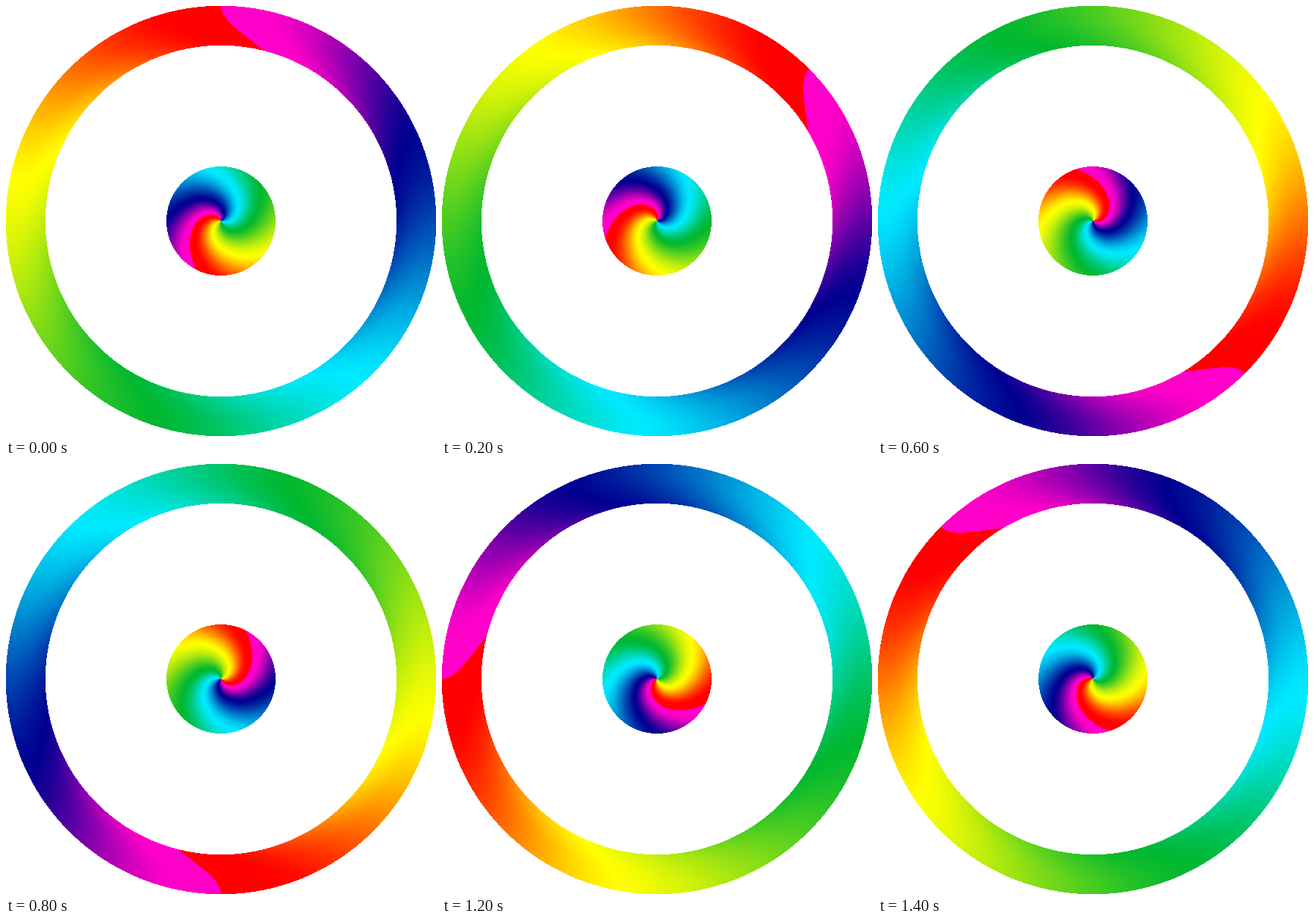
Write an HTML page with a canvas that moves like this. It is 587 px wide and 587 px high and loops after 1600 ms.

```html
<!DOCTYPE html>
<html lang="en">
<head>
<meta charset="utf-8">
<title>Twirled colour wheel</title>
<style>
  html, body { margin: 0; width: 100%; height: 100%; overflow: hidden; background: #fff; }
  canvas { display: block; }
</style>
</head>
<body>
<canvas id="stage" width="587" height="587"></canvas>
<script>
const SIZE = 587, MID = SIZE / 2;
const RING_IN = 239.7, RING_OUT = 293.8, DISC = 74.5;
const STEP_MS = 200, STEPS = 8;

// Clockwise angle in degrees, then red, green, blue
const stops = [
  [0, 255, 0, 200], [13, 255, 0, 200], [65, 0, 0, 144], [138, 0, 234, 255],
  [198, 0, 183, 47], [280, 255, 255, 0], [344, 255, 0, 0], [360, 255, 0, 0]
];

const ctx = document.getElementById('stage').getContext('2d');
const image = ctx.createImageData(SIZE, SIZE);
const pixels = new Uint32Array(image.data.buffer);
const wrap = a => ((a % 360) + 360) % 360;

function colour(angle) {
  let i = 0;
  while (angle >= stops[i + 1][0]) i++;
  const a = stops[i], b = stops[i + 1];
  const t = (angle - a[0]) / (b[0] - a[0]);
  const k = (t + t * t * (3 - 2 * t)) / 2;
  const [r, g, bl] = [1, 2, 3].map(c => Math.round(a[c] + (b[c] - a[c]) * k));
  return (255 << 24 | bl << 16 | g << 8 | r) >>> 0;
}

// Degrees by which the colours are twisted at radius r
function twist(r) {
  if (r > DISC) return 425 * (1 - r / MID) ** 2;
  const depth = DISC - r;
  return 207 + depth + 0.011 * depth * depth;
}

const palette = Uint32Array.from({ length: 3600 }, (_, i) => colour(i / 10));

// Palette index of every coloured pixel, -1 where it is white
const index = new Int16Array(SIZE * SIZE).fill(-1);
for (let y = 0; y < SIZE; y++) {
  for (let x = 0; x < SIZE; x++) {
    const dx = x + 0.5 - MID, dy = y + 0.5 - MID, r = Math.hypot(dx, dy);
    if (r > RING_OUT || (r > DISC && r < RING_IN)) continue;
    const angle = Math.atan2(dx, -dy) * 180 / Math.PI;
    index[y * SIZE + x] = Math.floor(wrap(angle - twist(r)) * 10) % 3600;
  }
}

function draw(step) {
  const shift = 3600 - step * 3600 / STEPS;
  for (let i = 0; i < index.length; i++) {
    pixels[i] = index[i] < 0 ? 0xffffffff : palette[(index[i] + shift) % 3600];
  }
  ctx.putImageData(image, 0, 0);
}

let shown = -1;
function tick(now) {
  const step = Math.floor(now / STEP_MS) % STEPS;
  if (step !== shown) draw(shown = step);
  requestAnimationFrame(tick);
}
draw(0);
requestAnimationFrame(tick);
</script>
</body>
</html>
```
